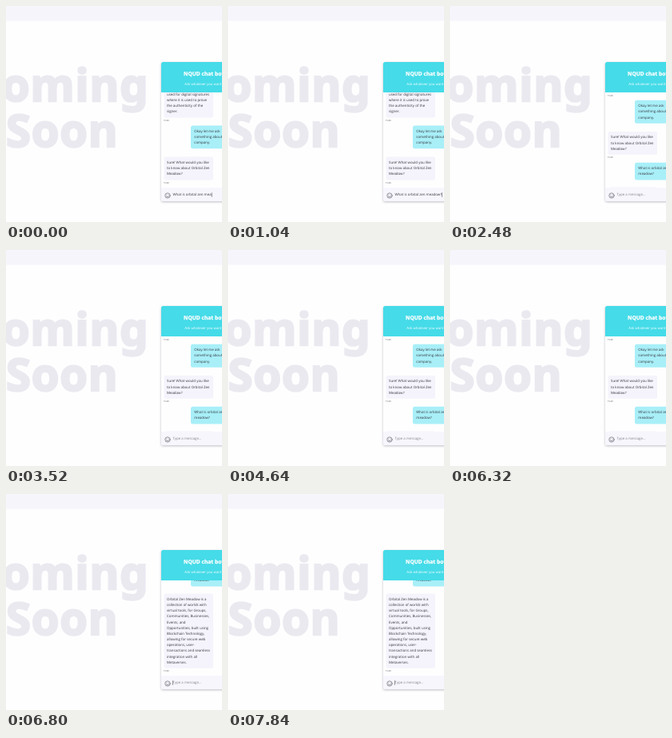
Animation, 270 px wide and 270 px high, one loop 8 s. Source, as an HTML page:

```html
<!DOCTYPE html>
<html lang="en">
<head>
<meta charset="utf-8">
<title>Coming soon with chat</title>
<style>
  html, body { margin: 0; width: 100%; height: 100%; overflow: hidden; background: #fefefe; }
  svg { display: block; width: 270px; height: 270px; }
  text { font-family: "Open Sans", "Noto Sans", sans-serif; font-size: 4.4px; fill: #36363e;
         text-rendering: geometricPrecision; white-space: pre; }
  .big { font-family: "Noto Sans", sans-serif; font-weight: 700; font-size: 56px; letter-spacing: .9px;
         fill: #ebe9f0; stroke: #ebe9f0; stroke-width: 2.6px; }
  .title { font-weight: 700; font-size: 6.7px; fill: #fff; stroke: #fff; stroke-width: .25px; }
  .sub { font-size: 4.3px; fill: #fff; }
  .stamp { font-size: 2.7px; fill: #55555d; }
  .hint { fill: #85858c; }
  .bot { fill: #f5f3fb; }
  .user { fill: #a8eff8; }
  .panel { filter: drop-shadow(0 1px 1.5px rgba(70, 70, 95, .35)); }
</style>
</head>
<body>
<svg viewBox="0 0 270 270">
  <defs>
    <clipPath id="view"><rect x="193" y="108" width="77" height="119"/></clipPath>
  </defs>
  <rect width="270" height="270" fill="#fefefe"/>
  <rect width="270" height="18.5" fill="#f7f5fc"/>
  <text class="big" x="178.5" y="118.5" text-anchor="end">oming</text>
  <text class="big" x="140.5" y="175.5" text-anchor="end">Soon</text>

  <rect class="panel" x="194" y="70" width="110" height="174" rx="2.5" fill="#fefefe"/>
  <g clip-path="url(#view)"><g id="log"></g></g>
  <path d="M194 108V72.5a2.5 2.5 0 0 1 2.5-2.5H270V108Z" fill="#45dbe8"/>
  <text class="title" x="222" y="87">NQUD chat bot</text>
  <text class="sub" x="223.3" y="99.2">Ask whatever you want</text>

  <path d="M194 227H270V244H196.5a2.5 2.5 0 0 1-2.5-2.5Z" fill="#f8f6fd"/>
  <g fill="none" stroke="#55555e" stroke-width=".6" stroke-linecap="round">
    <circle cx="202" cy="237" r="3.2"/>
    <path d="M200.3 238a2 1.7 0 0 0 3.4 0M200.8 236v.1M203.2 236v.1"/>
  </g>
  <text id="field" x="208.5" y="237.4"></text>
  <rect id="caret" y="233.2" width=".5" height="5.6" fill="#333"/>
</svg>
<script>
const LOOP = 8000, SEND = 1100, BLINK = 530, LINE = 7.15;
const $ = id => document.getElementById(id);
const log = $('log'), field = $('field'), caret = $('caret');

function add(tag, attrs, label) {
  const el = document.createElementNS('http://www.w3.org/2000/svg', tag);
  for (const key in attrs) el.setAttribute(key, attrs[key]);
  if (label) el.textContent = label;
  log.append(el);
}

// y is the baseline of the first line
function bubble(who, y, lines) {
  const mine = who === 'user';
  add('rect', {
    class: who, x: mine ? 231 : 197.5, y: y - 8.5,
    width: mine ? 60 : 61.5, height: lines.length * LINE + 7.5, rx: 2.5
  });
  lines.forEach((line, i) => add('text', { x: mine ? 235.3 : 201, y: y + i * LINE }, line));
}

const stamp = y => add('text', { class: 'stamp', x: 197, y }, '15:40');

bubble('bot', 73.2, ['It is a method', 'used for digital signatures', 'where it is used to prove',
  'the authenticity of the', 'signer.']);
stamp(112.8);
bubble('user', 126.3, ['Okay let me ask', 'something about your', 'company.']);
bubble('bot', 165.4, ['Sure! What would you like', 'to know about Orbital Zen', 'Meadow?']);
stamp(190.4);
bubble('user', 204.3, ['What is orbital zen', 'meadow?']);
bubble('bot', 235, ['Orbital Zen Meadow is a', 'collection of worlds with', 'virtual tools, for Groups,',
  'Communities, Businesses,', 'Events, and', 'Opportunities, built using', 'Blockchain Technology,',
  'allowing for secure web', 'operations, user-', 'transactions and seamless', 'integration with all',
  'Metaverses.']);
stamp(324.2);

// start, end, distance
const scrolls = [[SEND, 1560, -31.6], [6360, 6760, -102]];
const keys = [120, 240, 360, 460];
const question = 'What is orbital zen meadow?';

function ease(p) {
  p = Math.min(1, Math.max(0, p));
  return p < .5 ? 2 * p * p : 1 - 2 * (1 - p) ** 2;
}

function draw(t) {
  const y = scrolls.reduce((sum, [a, b, d]) => sum + d * ease((t - a) / (b - a)), 31.6);
  log.setAttribute('transform', `translate(0 ${y.toFixed(2)})`);

  const typing = t < SEND;
  const count = question.length - keys.filter(k => k > t).length;
  const value = typing ? question.slice(0, count) : 'Type a message...';
  if (field.textContent !== value) field.textContent = value;
  field.setAttribute('class', typing ? '' : 'hint');

  const on = t < 1500 || Math.floor((t - 7840 + 20 * BLINK) / BLINK) % 2 === 0;
  caret.setAttribute('x', typing ? 208.8 + field.getComputedTextLength() : 208);
  caret.setAttribute('opacity', on ? 1 : 0);
}

const start = performance.now();
function tick() {
  draw((performance.now() - start) % LOOP);
  requestAnimationFrame(tick);
}
tick();
</script>
</body>
</html>
```
